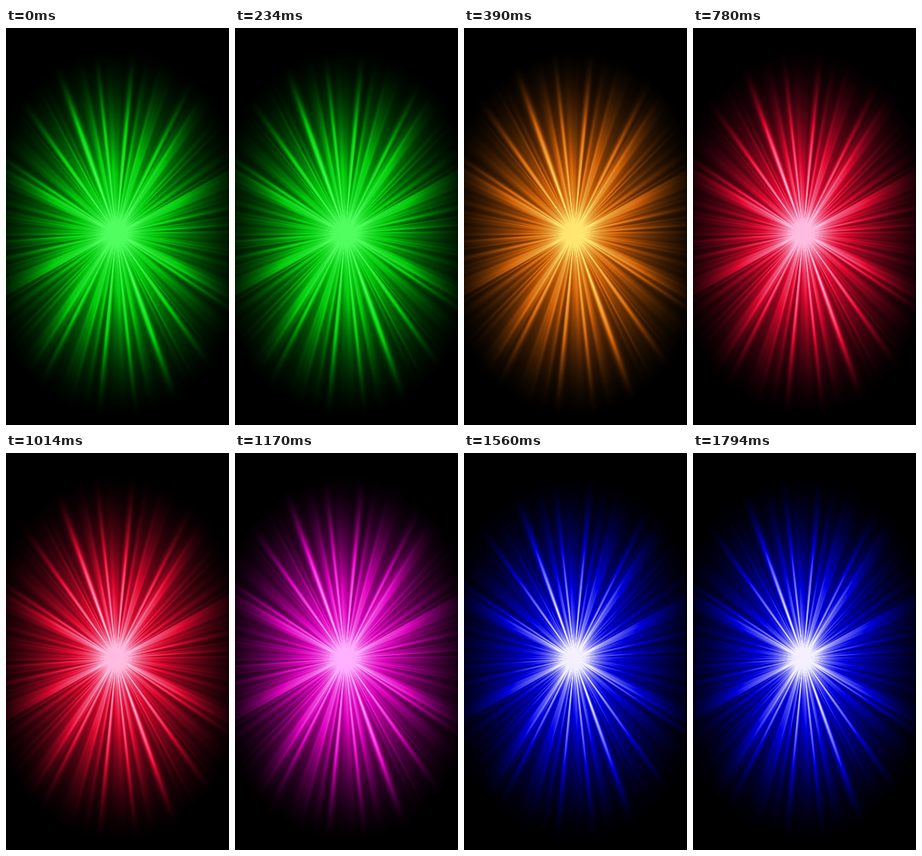
Animation of 360 by 640 pixels, one loop 1950 ms. Source, as an HTML page with a canvas:

```html
<!DOCTYPE html>
<html lang="en">
<head>
<meta charset="utf-8">
<title>Colour burst</title>
<style>
  html, body { margin: 0; width: 100%; height: 100%; overflow: hidden; background: #000; }
  canvas { display: block; width: 360px; height: 640px; }
</style>
</head>
<body>
<canvas id="stage" width="360" height="640"></canvas>
<script>
const start = performance.now();
const W = 360, H = 640, CX = 178, CY = 331, RX = 230, RY = 302, STEP = 390;
const ctx = document.getElementById('stage').getContext('2d');

// Ray colour and core colour of each burst
const palettes = [
  ['#00c80a', '#50ff5f'],
  ['#d06008', '#ffe670'],
  ['#e00830', '#ffbce0'],
  ['#dc00bc', '#ffb0ff'],
  ['#0000e6', '#f4f0ff']
];
const KNEE = .6, FULL = 1.6;

let seed = 11;
const random = (low, high) => {
  seed = (seed * 16807) % 2147483647;
  return low + (high - low) * seed / 2147483647;
};

// Beam angles are in degrees; each beam also shines the opposite way.
const beams = [];
const addBeam = (angle, spread, strength) => beams.push({ angle, spread, strength });
addBeam(70.5, 1.1, 1.5);
[54.7, 83.7, 95.2, 105, 116.7].forEach(angle => addBeam(angle, .8, .75));
[28.6, 122.8, 153].forEach(angle => addBeam(angle, 1.8, .8));
const FINE = 70;
for (let i = 0; i < FINE; i++) {
  addBeam((i + random(0, 1)) * 180 / FINE, random(.4, 1.3), random(.05, .55));
}

const BINS = 3600, BASE = .72;
const beamLight = Float32Array.from({ length: BINS }, (_, i) =>
  beams.reduce((sum, { angle, spread, strength }) => {
    const gap = Math.abs(i * 180 / BINS - angle);
    const d = Math.min(gap, 180 - gap) / spread;
    return sum + strength * Math.exp(-d * d / 2);
  }, BASE));

function lightAt(x, y) {
  const dx = x + .5 - CX, dy = y + .5 - CY;
  const turn = (Math.atan2(dy, dx) / Math.PI + 2) % 1;
  const fade = Math.max(0, 1 - Math.hypot(dx / RX, dy / RY)) ** 1.4;
  const core = Math.exp(-(dx * dx + dy * dy) / 1100);
  return core + fade * beamLight[Math.floor(turn * BINS) % BINS];
}

const light = Float32Array.from({ length: W * H }, (_, i) => lightAt(i % W, Math.floor(i / W)));

const rgb = hex => [1, 3, 5].map(i => parseInt(hex.slice(i, i + 2), 16));

function tint(palette) {
  const [ray, core] = palette.map(rgb);
  const image = ctx.createImageData(W, H);
  light.forEach((v, i) => {
    const rise = Math.min(1, v / KNEE) ** 1.2;
    const heat = Math.min(1, Math.max(0, (v - KNEE) / (FULL - KNEE))) ** .8;
    for (let c = 0; c < 3; c++) {
      image.data[i * 4 + c] = ray[c] * rise + (core[c] - ray[c]) * heat;
    }
    image.data[i * 4 + 3] = 255;
  });
  return image;
}

const bursts = palettes.map(tint);
let shown = -1;

function draw() {
  const index = Math.floor((performance.now() - start) / STEP) % bursts.length;
  if (index !== shown) ctx.putImageData(bursts[shown = index], 0, 0);
  requestAnimationFrame(draw);
}
draw();
</script>
</body>
</html>
```
